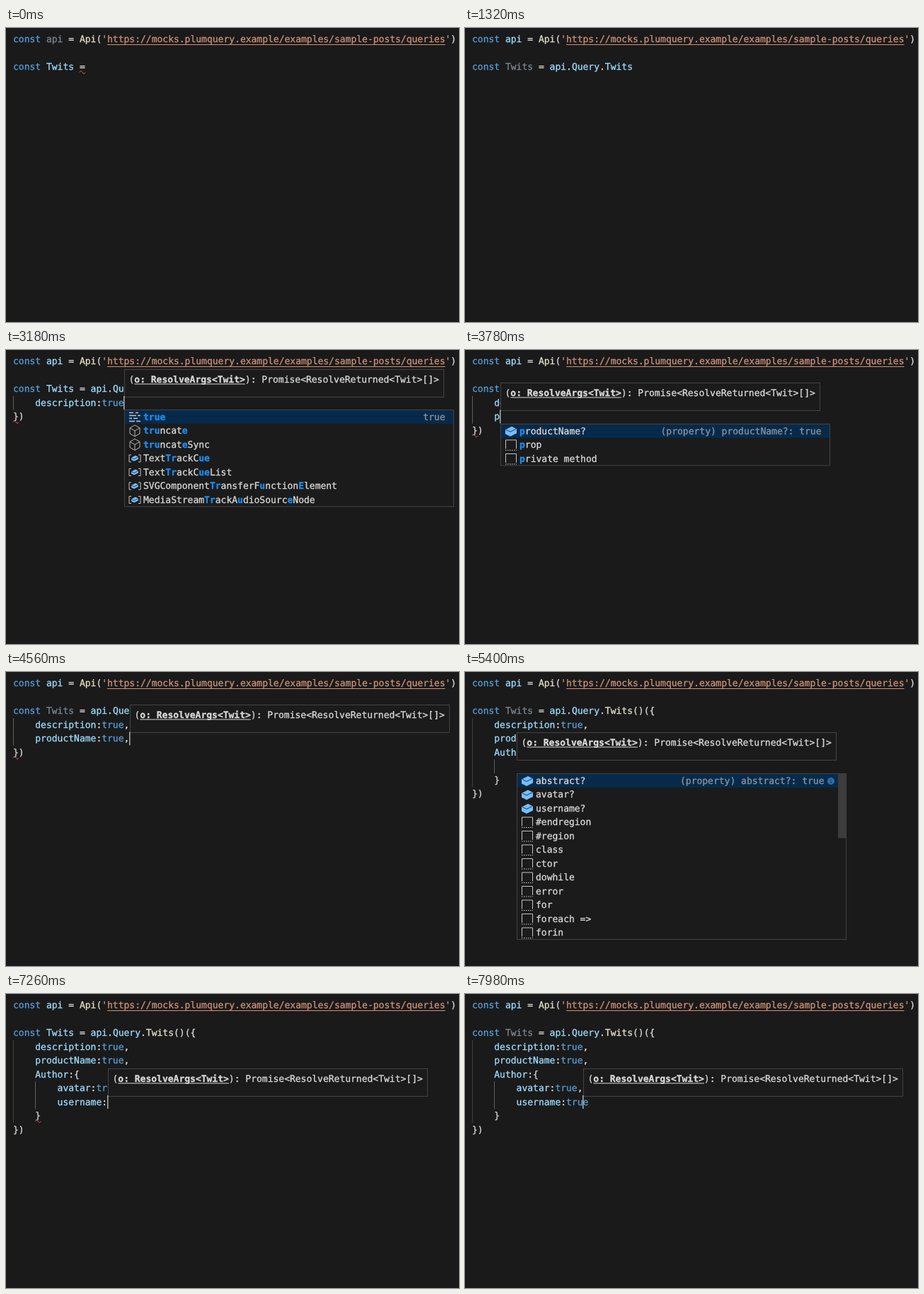
These frames come from a looping animation (640x415 px, 8000 ms). An HTML page:

```html
<!DOCTYPE html>
<html lang="en">
<head>
<meta charset="utf-8">
<title>Code editor</title>
<style>
  html, body { margin: 0; width: 100%; height: 100%; overflow: hidden; background: #1a1a1a; }
  svg { display: block; width: 100%; height: 100%; }
  text { font: 13px "DejaVu Sans Mono", monospace; text-rendering: geometricPrecision; white-space: pre; stroke-width: .3px; }
  .bold { font-weight: bold; }
</style>
</head>
<body>
<svg id="stage" viewBox="0 0 640 415"></svg>
<script>
const LOOP = 8000, CHAR = 7.827, LINE = 19.5, LEFT = 10, RIGHT = 633.5;
const URL_TEXT = 'https://mocks.plumquery.example/examples/sample-posts/queries';
const START = `const api = Api('${URL_TEXT}')\n\nconst Twits =`;
const COLOR = {
  keyword: '#569cd6', name: '#9cdcfe', call: '#e2dfc6', string: '#ce9178', plain: '#dadada',
  unused: '#7b8790', match: '#1890f5', panel: '#1b1b1b', selected: '#082a4a', border: '#434343', error: '#b5604e'
};

// Suggestions: the first letter is the icon kind, the rest the label.
const SNIPPETS = 's#endregion|s#region|sclass|sctor|sdowhile|serror|sfor|sforeach =>|sforin';
const LISTS = {
  api: 'vapi|vApi|vapiKey|vapiUrl|mapply|vApiError|mappend|mappendFile|mappendFileSync|vAppBanner|vapplicationCache|vWebApp',
  query: 'fQuery|fMutation|fSubscription',
  twits: 'fTwits',
  fields: 'fAuthor?|fdescription?|fproductName?|' + SNIPPETS + '|sprop|sprivate method',
  author: 'fabstract?|favatar?|fusername?|' + SNIPPETS,
  true: 'ktrue|kthis|kthrow|ktry|ktypeof|stry|strycatch|mtruncate|mtruncateSync|vTextTrackCue|vTextTrackCueList|' +
        'vSVGComponentTransferFunctionElement|vMediaStreamTrackAudioSourceNode'
};

// [time, keys typed, open suggestion list, caret lag in characters]
const STEPS = [
  [120, ' '], [180, 'a'], [240, 'p', 'api'], [360, 'i', 'api'], [480, ''],
  [660, '.', 'query'], [720, 'Q', 'query'], [840, 'uery'],
  [960, '.', 'twits'], [1020, 'T', 'twits'], [1140, 'wits'],
  [1380, '('], [1500, ')'], [1680, '('], [1860, '{'], [2040, '\n'],
  [2340, '', 'fields'], [2460, 'd', 'fields'], [2580, 'e', 'fields'], [2700, 'scription'], [2760, ':'],
  ...typeTrue(2880, 60), [3300, ''], [3420, ','], [3540, '\n'],
  [3660, '', 'fields'], [3780, 'p', 'fields'], [3900, 'r', 'fields'], [4020, 'oductName'], [4080, ':'],
  ...typeTrue(4140, 60), [4440, ''], [4500, ','], [4620, '\n'],
  [4680, '', 'fields'], [4740, 'A', 'fields'], [4860, 'uthor'], [4920, ':'], [4980, '{'], [5100, '\n'],
  [5280, '', 'author'], [5700, 'a', 'author'], [5760, 'v', 'author'], [5820, 'atar'], [5880, ':'],
  ...typeTrue(5940, 60), [6240, ''], [6300, ','], [6360, '\n'],
  [6540, '', 'author'], [6720, 'u', 'author'], [6840, 's', 'author'], [6960, 'ername'], [7140, ':'],
  ...typeTrue(7380, 120).slice(0, 3), [7860, ''], [7960, 'e', '', 1]
];
const HINT_FROM = 1680;
const UNUSED = [[480, 2340], [4440, 5940], [7700, LOOP]];
const BAD_BRACE = [[2400, 4900], [5700, 7700]];
const CARET_OFF = [[0, 120], [520, 660], [1260, 1380], [5340, 5600]];

function typeTrue(start, gap) {
  return [...'true'].map((key, i) => [start + i * gap, key, 'true']);
}

const within = (t, spans) => spans.some(([from, to]) => t >= from && t < to);
const colX = col => LEFT + col * CHAR;
const middle = row => 16 + row * LINE;
const escapeText = s => s.replace(/&/g, '&amp;').replace(/</g, '&lt;');
const text = (x, y, s, fill, cls = '') =>
  `<text x="${x}" y="${y + 4}" fill="${fill}" stroke="${fill}" class="${cls}">${escapeText(s)}</text>`;
const rect = (x, y, w, h, fill, stroke = 'none') =>
  `<rect x="${x}" y="${y}" width="${w}" height="${h}" fill="${fill}" stroke="${stroke}"/>`;
const path = (d, stroke, fill = 'none', extra = '') =>
  `<path d="${d}" stroke="${stroke}" fill="${fill}" ${extra}/>`;

const ICONS = {
  k: path('M-8-6h6m3 0h4M-8-2h10m2 0h4M-8 2h4m2 0h6M-8 6h8m2 0h6', '#c5c5c5', 'none', 'stroke-width="1.3"'),
  m: path('M0-8l7 4v8l-7 4l-7-4v-8zM-7-4l7 4l7-4M0 0v8', '#b5b5b5'),
  v: path('M-5-5h-3v10h3M5-5h3v10h-3', '#c5c5c5') +
     path('M-5-1L1-4L5-2V1L-1 4L-5 2z', 'none', '#75beff') + path('M-5-1L-1 1L5-2', '#23405a'),
  f: path('M-8-2L1-6.500L8-3V3L-1 7.500L-8 4z', 'none', '#75beff') + path('M-7-2L-1 1L7-3', '#17395a'),
  s: path('M-7.500 5.500V-7H7.500V5.500', '#c5c5c5') +
     path('M-8 7.500H8', '#c5c5c5', 'none', 'stroke-dasharray="1.500 1.500"')
};

// Applies the keystrokes up to time t, with auto-closing brackets and indentation.
function documentAt(t) {
  let before = START, after = '', list, lag = 0;
  for (const [time, keys, open, caretLag = 0] of STEPS) {
    if (time > t) break;
    list = open;
    lag = caretLag;
    for (const key of keys) {
      if (key === ')' && after[0] === ')') after = after.slice(1);
      if (key === '(') after = ')' + after;
      if (key === '{') after = '}' + after;
      if (key === '\n') {
        const indent = before.split('\n').pop().match(/^ */)[0];
        const opens = before.endsWith('{');
        if (opens) after = '\n' + indent + after;
        before += '\n' + indent + (opens ? '    ' : '');
      } else before += key;
    }
  }
  const lines = before.split('\n'), current = lines.pop();
  return {
    rows: (before + after).split('\n'), row: lines.length, col: current.length - lag,
    word: current.match(/\w*$/)[0], list
  };
}

function codeRow(line, row, unusedName) {
  let out = '', previous = '';
  for (const { 0: token, index } of line.matchAll(/'|https:[^']+|\w+|[^\s\w']/g)) {
    let fill = COLOR.plain;
    if (token === 'const' || token === 'true') fill = COLOR.keyword;
    else if (token === "'" || token === URL_TEXT) fill = COLOR.string;
    else if (/\w/.test(token)) fill = line[index + token.length] === '(' ? COLOR.call : COLOR.name;
    if (previous === 'const' && token === unusedName) fill = COLOR.unused;
    out += text(colX(index), middle(row), token, fill);
    if (token === URL_TEXT) out += rect(colX(index), 23, token.length * CHAR, 1, COLOR.string);
    previous = token;
  }
  return out;
}

function guides(doc) {
  const depth = line => line.match(/^ */)[0].length / 4;
  const active = depth(doc.rows[doc.row]) - 1;
  return doc.rows.map((line, row) => {
    let out = '';
    for (let k = 0; k < depth(line); k++)
      out += rect(Math.floor(colX(k * 4)), middle(row) - 9.5, 1, LINE, k === active ? '#606060' : '#404040');
    return out;
  }).join('');
}

const squiggle = (col, row) =>
  path(`M${colX(col)} ${middle(row) + 7.5}q2-4 4 0t4 0`, COLOR.error);

// Indices of the letters of label that match the typed word, or null.
function matchLetters(label, word) {
  if (!word) return [];
  const lower = label.toLowerCase(), query = word.toLowerCase();
  for (let start = 0; start < label.length; start++) {
    const wordStart = start === 0 || /[A-Z]/.test(label[start]) || /\W/.test(label[start - 1]);
    if (!wordStart || !lower.startsWith(query.slice(0, 2), start)) continue;
    const hits = [];
    let at = start;
    for (const letter of query) {
      at = lower.indexOf(letter, at);
      if (at < 0) break;
      hits.push(at++);
    }
    if (hits.length === query.length) return hits;
  }
  return null;
}

function suggestions(doc, x) {
  const items = LISTS[doc.list].split('|')
    .map(item => ({ kind: item[0], label: item.slice(1), hits: matchLetters(item.slice(1), doc.word) }))
    .filter(item => item.hits).slice(0, 12);
  if (!items.length) return '';
  const width = 465, left = Math.min(x, RIGHT - width), right = left + width;
  const top = Math.floor(middle(doc.row) + 10) + .5, height = items.length * LINE, scrolls = items.length === 12;
  let out = rect(left, top, width, height, COLOR.panel, COLOR.border) +
            rect(left + .5, top + .5, width - 1, LINE - .5, COLOR.selected);
  items.forEach(({ kind, label, hits }, i) => {
    const y = top + 10 + i * LINE;
    out += `<g transform="translate(${left + 14.5} ${y})">${ICONS[kind]}</g>`;
    [...label].forEach((letter, n) => {
      const hit = hits.includes(n);
      out += text(left + 26.5 + n * CHAR, y, letter, hit ? COLOR.match : COLOR.plain, hit ? 'bold' : '');
    });
  });
  const { kind, label } = items[0], y = top + 10;
  const detail = kind === 'f' ? `(property) ${label}: true` : label;
  out += text(right - (scrolls ? 31 : 12) - detail.length * CHAR, y, detail, '#8796a4');
  if (scrolls) {
    out += `<circle cx="${right - 21.5}" cy="${y + .5}" r="5" fill="#2c6ea8"/>` +
           path(`M${right - 21.5} ${y - 2}v1m0 1v3.500`, COLOR.selected) +
           rect(right - 11.5, top, 11, 91, '#3c3c3d');
  }
  return out;
}

function hint(doc, x) {
  const width = 451, left = Math.min(x, RIGHT - width), bottom = Math.floor(middle(doc.row) - 8.5) + .5;
  const parameter = 'o: ResolveArgs<Twit>', y = bottom - 24.5, start = left + 6;
  const rest = start + (parameter.length + 1) * CHAR;
  return rect(left, bottom - 39, width, 39, COLOR.panel, COLOR.border) +
    text(start, y, '(', COLOR.plain) +
    text(start + CHAR, y, parameter, COLOR.plain, 'bold') +
    rect(start + CHAR, y + 5.5, parameter.length * CHAR, 1, COLOR.plain) +
    text(rest, y, '): Promise<ResolveReturned<Twit>[]>', COLOR.plain);
}

function render(t) {
  const doc = documentAt(t), x = colX(doc.col), panelX = Math.floor(x) + 1.5;
  const unusedName = t < 120 ? 'api' : within(t, UNUSED) ? 'Twits' : '';
  let out = rect(0, 0, 640, 415, '#1a1a1a') + guides(doc);
  out += doc.rows.map((line, row) => codeRow(line, row, unusedName)).join('');
  if (t < 120) out += squiggle(12, 2);
  if (within(t, BAD_BRACE)) out += squiggle(doc.rows[doc.row + 1].indexOf('}'), doc.row + 1);
  if (t >= HINT_FROM) out += hint(doc, panelX);
  if (doc.list) out += suggestions(doc, panelX);
  if (!within(t, CARET_OFF)) out += rect(Math.floor(x), middle(doc.row) - 9.5, 1.5, 19, '#aeafad');
  return out;
}

const stage = document.getElementById('stage');
let shown = '';
function tick() {
  const picture = render(performance.now() % LOOP);
  if (picture !== shown) stage.innerHTML = shown = picture;
  requestAnimationFrame(tick);
}
tick();
</script>
</body>
</html>
```
